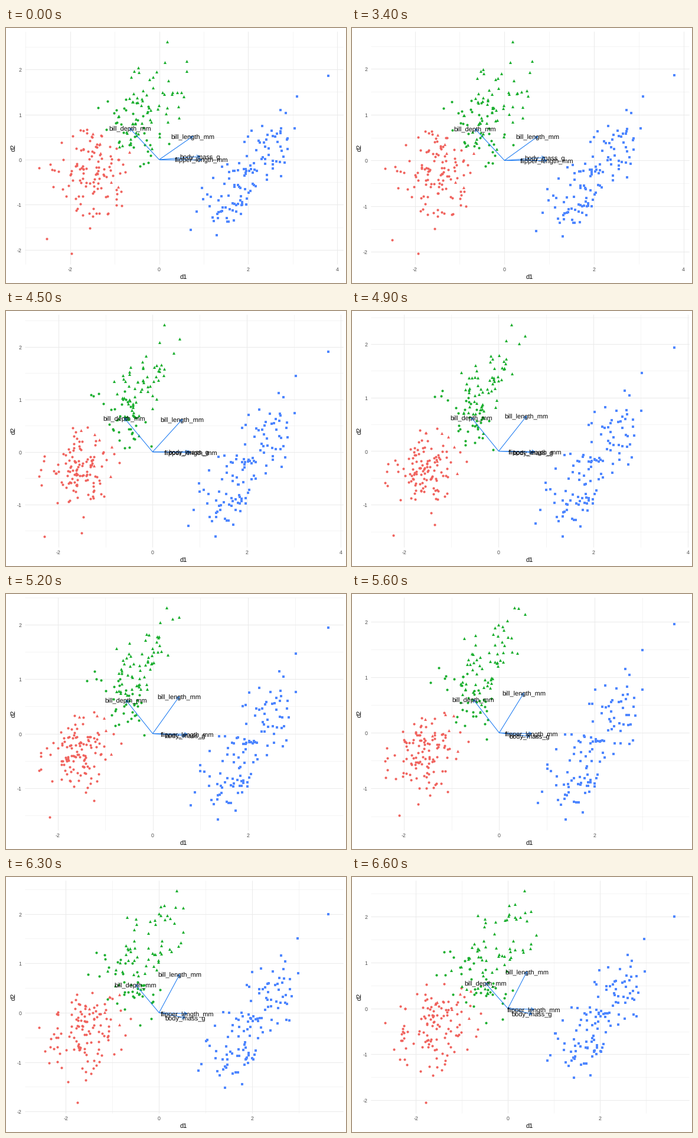
Animation of 576 by 432 pixels, one loop 10 s. Source, as a matplotlib script:

```python
import math

import numpy as np
import matplotlib
import matplotlib.pyplot as plt
from matplotlib.animation import FuncAnimation
from matplotlib.collections import LineCollection

matplotlib.rcParams["font.family"] = "Liberation Sans"
matplotlib.rcParams["text.hinting"] = "none"

WIDTH, HEIGHT, DPI = 576, 432, 72
LEFT, RIGHT, TOP, BOTTOM = 31.5, 570.5, 5.5, 400
FRAMES, INTERVAL, HOLD, STEPS = 100, 100, 33, 33
RED, GREEN, BLUE, ARROW = "#F0625D", "#1BAF2F", "#4F87FF", "#1E7CF2"

rng = np.random.default_rng(12)


def blob(n, mx, my, sx, sy, r=0):
    """Round cloud cut off at 2.45 deviations, skewed to correlation r."""
    radius = 2.45 * np.sqrt(1 - np.sqrt(rng.random(n)))
    angle = rng.uniform(0, 2 * math.pi, n)
    u, v = radius * np.cos(angle), radius * np.sin(angle)
    return np.column_stack([mx + sx * u, my + sy * (r * u + math.sqrt(1 - r * r) * v)])


def shuffled(n, start, end):
    """Points that travel to an unrelated place in the final cloud."""
    return np.hstack([blob(n, *start), blob(n, *end)])


def drifting(n, *start):
    """Points that only shear a little."""
    points = blob(n, *start)
    shift = blob(n, -0.03, 0.12, 0.02, 0.11)
    shift[:, 0] -= 0.095 * points[:, 1]
    return np.hstack([points, points + shift])


# Outermost points (x0, y0, x1, y1); they set the axis limits.
red_edge = [(-1.97, -2.08, -0.70, -0.61), (-2.53, -1.75, -1.90, -1.37),
            (-2.70, -0.18, -1.65, -0.15), (-1.64, -0.20, -2.67, -0.31),
            (-2.38, -0.60, -2.33, -0.70), (-1.50, 0.50, -1.78, -2.05)]
green_edge = [(0.18, 2.61, 0.37, 2.09), (0.50, 1.49, 0.36, 2.565), (0.617, 2.18, 0.50, 2.12)]
blue_edge = [(3.80, 1.857, 3.615, 2.004), (3.10, 1.40, 2.955, 1.52),
             (1.293, -1.67, 1.43, -1.51), (0.71, -1.556, 0.86, -1.136)]

red_dots = shuffled(108, (-1.58, -0.32, 0.39, 0.50), (-1.60, -0.43, 0.42, 0.47, 0.2))
red_triangles = shuffled(6, (-1.15, -0.10, 0.30, 0.35), (-1.15, 0.0, 0.25, 0.25))
green_dots = shuffled(36, (-0.72, 0.60, 0.40, 0.40, -0.3), (-0.70, 0.50, 0.38, 0.40, -0.4))
green_triangles = shuffled(60, (-0.25, 1.20, 0.40, 0.50, 0.45), (-0.32, 1.25, 0.40, 0.46, 0.4))
blue_squares = np.vstack([drifting(58, 1.55, -0.75, 0.32, 0.35, 0.45),
                          drifting(57, 2.47, 0.17, 0.36, 0.42, 0.5)])

# data, marker, colour, area
GROUPS = [(np.vstack([red_dots, red_edge]), "o", RED, 17),
          (red_triangles, "^", RED, 25),
          (green_dots, "o", GREEN, 17),
          (np.vstack([green_triangles, green_edge]), "^", GREEN, 25),
          (np.vstack([blue_squares, blue_edge]), "s", BLUE, 16)]

# variable, first tip, last tip
AXES = [("bill_length_mm", (0.752, 0.515), (0.41, 0.80)),
        ("bill_depth_mm", (-0.662, 0.695), (-0.49, 0.555)),
        ("flipper_length_mm", (0.955, 0.0), (0.565, -0.02)),
        ("body_mass_g", (0.91, 0.07), (0.52, -0.12))]

fig = plt.figure(figsize=(WIDTH / DPI, HEIGHT / DPI), dpi=DPI, facecolor="white")
ax = fig.add_axes([0, 0, 1, 1])


def mix(start, end, t):
    return np.asarray(start) * (1 - t) + np.asarray(end) * t


def ticks(lo, hi, gap):
    return np.arange(math.ceil(lo / gap), math.floor(hi / gap) + 1) * gap


def draw_grid(lo, hi, to_px):
    for gap_x, gap_y, width in ((1, 0.5, 0.53), (2, 1, 1.07)):
        x_ticks, y_ticks = ticks(lo[0], hi[0], gap_x), ticks(lo[1], hi[1], gap_y)
        xs = [to_px((x, 0))[0] for x in x_ticks]
        ys = [to_px((0, y))[1] for y in y_ticks]
        lines = [[(x, TOP), (x, BOTTOM)] for x in xs]
        lines += [[(LEFT, y), (RIGHT, y)] for y in ys]
        ax.add_collection(LineCollection(lines, colors="#EBEBEB", linewidths=width, zorder=1))
    style = dict(fontsize=8.8, color="#4D4D4D", va="baseline")
    for value, x in zip(x_ticks, xs):
        ax.text(x, 412, f"{value:.0f}", ha="center", **style)
    for value, y in zip(y_ticks, ys):
        ax.text(26.5, y + 4, f"{value:.0f}", ha="right", **style)


def draw_arrow(origin, tip):
    dx, dy = tip - origin
    angle = math.atan2(dy, dx)
    wings = [tip - 6 * np.array([math.cos(angle + a), math.sin(angle + a)])
             for a in (-math.pi / 6, math.pi / 6)]
    for path in ([origin, tip], [wings[0], tip, wings[1]]):
        ax.plot(*np.array(path).T, color=ARROW, lw=1.07, zorder=3,
                solid_capstyle="butt", solid_joinstyle="round")


def draw(frame):
    t = min(max(frame - HOLD, 0), STEPS) / STEPS
    clouds = [mix(data[:, :2], data[:, 2:], t) for data, *_ in GROUPS]
    points = np.vstack(clouds)
    lo, hi = points.min(axis=0), points.max(axis=0)
    pad = 0.05 * (hi - lo)
    lo, hi = lo - pad, hi + pad

    def to_px(point):
        return (LEFT, BOTTOM) + (point - lo) / (hi - lo) * (RIGHT - LEFT, TOP - BOTTOM)

    ax.clear()
    ax.set(xlim=(0, WIDTH), ylim=(HEIGHT, 0))
    ax.axis("off")
    draw_grid(lo, hi, to_px)

    for cloud, (_, marker, color, area) in zip(clouds, GROUPS):
        ax.scatter(*to_px(cloud).T, s=area, marker=marker, color=color, linewidths=0, zorder=2)

    for name, start, end in AXES:
        tip = to_px(mix(start, end, t))
        draw_arrow(to_px(np.zeros(2)), tip)
        ax.text(tip[0], tip[1] + 5, name, fontsize=11, color="black",
                ha="center", va="baseline", zorder=4)

    ax.text(301, 425.5, "d1", fontsize=11, ha="center", va="baseline")
    ax.text(18.5, 202.5, "d2", fontsize=11, ha="right", va="center", rotation=90)
    return []


anim = FuncAnimation(fig, draw, frames=FRAMES, interval=INTERVAL, init_func=lambda: [],
                     repeat=True, repeat_delay=0, blit=False)
plt.show()
```
